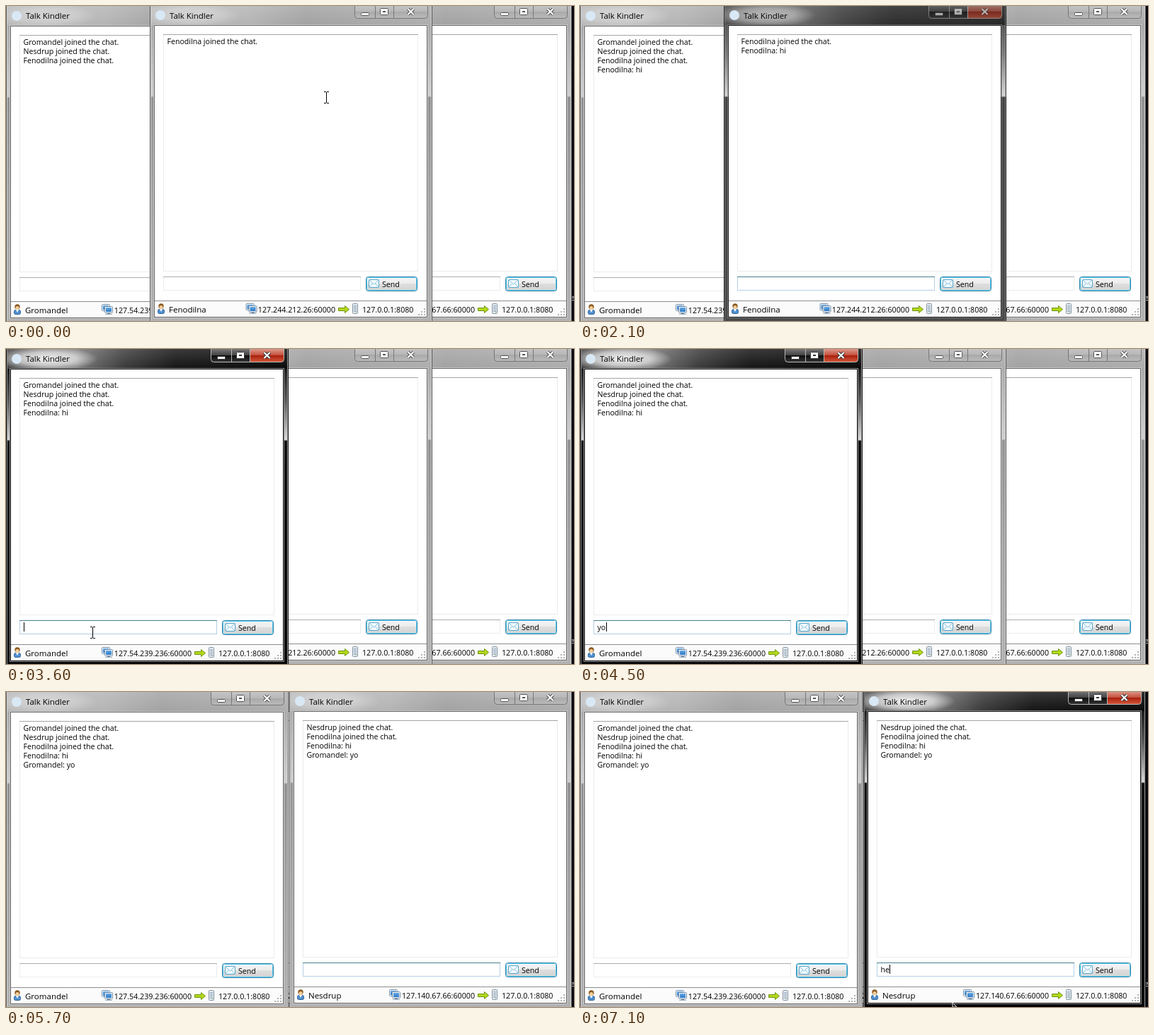
An HTML page with a canvas for the animation above (7.2 s loop, 802x446 px).

```html
<!DOCTYPE html>
<html lang="en">
<head>
<meta charset="utf-8">
<title>Chat windows</title>
<style>
html, body { margin: 0; width: 100%; height: 100%; overflow: hidden; background: #0b0b14; }
canvas { display: block; }
</style>
</head>
<body>
<canvas id="stage" width="802" height="446"></canvas>
<script>
const ctx = document.getElementById('stage').getContext('2d');
const LOOP = 7200, STEP = 100;
const UI = '"Open Sans", "Noto Sans", sans-serif';
const APP = 'Talk Kindler';
const ANN = 'Gromandel', BEN = 'Nesdrup', CAT = 'Fenodilna';

const joined = (name, at = 0) => ({ text: name + ' joined the chat.', at });
const hi = { text: CAT + ': hi', at: 1700 };
const yo = { text: ANN + ': yo', at: 4600 };

// on/off: activation times, focus: input focus span, typed: [time, text]
const left = {
  x: 0, y: 0, user: ANN, ip: '127.54.239.236:60000', ipX: 153,
  on: 3000, off: 5300, focus: [3000, 5500], caret: [3400, 5300],
  typed: [[3900, 'y'], [4100, 'yo'], [4600, '']],
  log: [joined(ANN), joined(BEN), joined(CAT), hi, yo]
};
const middle = {
  x: 203, y: -1, user: CAT, ip: '127.244.212.26:60000', ipX: 153.5,
  on: 400, off: 2000, focus: [400, 3000], caret: [400, 2000], blink: [900, 1200],
  typed: [[1300, 'h'], [1500, 'hi'], [1700, '']],
  log: [joined(CAT), hi]
};
const right = {
  x: 400, y: -1, user: BEN, ip: '127.140.67.66:60000', ipX: 159,
  on: 6300, off: 9999, focus: [5500, 9999], caret: [6300, 9999],
  typed: [[6800, 'h'], [6900, 'he']],
  log: [joined(BEN), joined(CAT), hi, yo]
};

const clamp = v => Math.max(0, Math.min(1, v));
const within = (t, [a, b]) => t >= a && t < b;

function rect(x, y, w, h, fill) {
  ctx.fillStyle = fill;
  ctx.fillRect(x, y, w, h);
}

function frame(x, y, w, h, stroke) {
  ctx.strokeStyle = stroke;
  ctx.lineWidth = 1;
  ctx.strokeRect(x + .5, y + .5, w - 1, h - 1);
}

function rounded(x, y, w, h, r, fill, stroke) {
  ctx.beginPath();
  ctx.roundRect(x, y, w, h, r);
  if (fill) { ctx.fillStyle = fill; ctx.fill(); }
  if (stroke) { ctx.strokeStyle = stroke; ctx.lineWidth = 1; ctx.stroke(); }
}

function poly(points, fill, stroke) {
  ctx.beginPath();
  points.forEach(([x, y]) => ctx.lineTo(x, y));
  ctx.closePath();
  ctx.fillStyle = fill;
  ctx.fill();
  if (stroke) { ctx.strokeStyle = stroke; ctx.lineWidth = 1; ctx.stroke(); }
}

function disc(x, y, r, fill) {
  ctx.beginPath();
  ctx.arc(x, y, r, 0, Math.PI * 2);
  ctx.fillStyle = fill;
  ctx.fill();
}

function ramp(x0, y0, x1, y1, ...stops) {
  const g = ctx.createLinearGradient(x0, y0, x1, y1);
  stops.forEach(([p, c]) => g.addColorStop(p, c));
  return g;
}

function label(text, x, y, size, align = 'left') {
  ctx.font = size + 'px ' + UI;
  ctx.textAlign = align;
  ctx.fillStyle = '#000';
  ctx.fillText(text, x, y);
}

function captionButtons(active) {
  const edge = active ? '#b8b8b8' : '#777';
  const face = active
    ? ramp(0, 0, 0, 18, [0, '#777'], [.48, '#444'], [.5, '#0c0c0c'], [1, '#333'])
    : ramp(0, 0, 0, 18, [0, '#c4c4c4'], [.48, '#b8b8b8'], [.5, '#a9a9a9'], [1, '#b9b9b9']);
  const red = ramp(0, 0, 0, 18, [0, '#dc9a8c'], [.48, '#c5503e'], [.5, '#a81d0b'], [1, '#d2573a']);
  rounded(289.5, -5, 55, 23.5, [0, 0, 0, 4], face, edge);
  rounded(344.5, -5, 48, 23.5, [0, 0, 4, 0], active ? red : face, edge);
  rect(318, 0, 1, 18, edge);

  const rim = active ? '#333' : '#555';
  rounded(298.5, 10.5, 11, 4, 1, '#fff', rim);
  rounded(325.5, 4.5, 11, 9, 1, '#fff', rim);
  rect(329, 8, 4, 2, rim);
  for (const [width, color] of [[4.4, rim], [2.2, '#fff']]) {
    ctx.strokeStyle = color;
    ctx.lineWidth = width;
    ctx.beginPath();
    ctx.moveTo(364.5, 5); ctx.lineTo(372.5, 13);
    ctx.moveTo(372.5, 5); ctx.lineTo(364.5, 13);
    ctx.stroke();
  }
}

function chrome(active) {
  rect(0, -2, 399, 452, active
    ? ramp(0, 28, 0, 446, [0, '#1c1c1c'], [.1, '#555'], [.24, '#d8d8d8'], [.245, '#111'], [1, '#050505'])
    : ramp(0, 28, 0, 446, [0, '#aaa'], [.24, '#cfcfcf'], [.245, '#929292'], [.6, '#a4a4a4'], [1, '#b2b2b2']));
  rect(0, -2, 399, 30, active
    ? ramp(0, 0, 399, 0, [0, '#444'], [.25, '#777'], [.42, '#3a3a3a'], [.6, '#151515'], [1, '#080808'])
    : ramp(0, 0, 399, 0, [0, '#b8b8b8'], [.35, '#b4b4b4'], [.55, '#a2a2a2'], [1, '#adadad']));
  rect(0, -2, 399, 30, ramp(0, 0, 0, 28, [0, 'rgba(255,255,255,.16)'], [1, 'rgba(255,255,255,0)']));

  // soft light behind the caption
  ctx.save();
  ctx.translate(58, 14);
  ctx.scale(1, .24);
  const glow = ctx.createRadialGradient(0, 0, 8, 0, 0, 72);
  const strength = active ? .85 : .35;
  glow.addColorStop(0, `rgba(255,255,255,${strength})`);
  glow.addColorStop(.5, `rgba(255,255,255,${strength * .72})`);
  glow.addColorStop(1, 'rgba(255,255,255,0)');
  rect(-58, -60, 140, 120, glow);
  ctx.restore();

  rect(0, -2, 1, 452, active ? '#111' : '#555');
  rect(1, -2, 1, 452, active ? '#888' : '#d2d2d2');
  rect(397, -2, 1, 452, active ? '#999' : '#d2d2d2');
  rect(398, -2, 1, 452, active ? '#111' : '#555');
  frame(5, 27, 388, 416, active ? '#8c8c8c' : '#cacaca');
  frame(6, 28, 386, 414, active ? '#111' : '#666');
  captionButtons(active);
}

function userIcon() {
  rounded(11.5, 430.5, 9, 6, 2, '#4f8fd0', '#356491');
  poly([[14, 430], [18, 430], [16, 434]], '#fff');
  disc(16, 426, 3.7, '#8a5a20');
  disc(16, 427.4, 2.5, '#f4cf9b');
}

function computerIcon(x) {
  const screen = (sx, sy) => {
    rounded(sx + .5, sy + .5, 11, 9, 1, '#f2f6fa', '#7890a8');
    rect(sx + 2, sy + 2, 8, 6, ramp(0, sy, 0, sy + 8, [0, '#77b9ee'], [1, '#2d78c4']));
  };
  screen(x, 422);
  screen(x + 4, 425);
  rect(x + 8, 435, 4, 1, '#7890a8');
  rect(x + 5, 436, 10, 1, '#9aabba');
}

function serverIcon() {
  rounded(286.5, 422.5, 7, 14, 1, '#e7edf3', '#8392a1');
  for (let y = 425; y < 434; y += 2) rect(288, y, 4, 1, '#8fa3b5');
  rect(291, 434, 1, 1, '#5bb030');
}

function sendButton() {
  rounded(305.5, 384.5, 72, 20, 3,
    ramp(0, 384, 0, 405, [0, '#f5f5f5'], [.48, '#ececec'], [.5, '#dedede'], [1, '#d2d2d2']), '#3580a6');
  rounded(306.5, 385.5, 70, 18, 2, null, '#50cdf2');
  rounded(309.5, 388.5, 14, 11, 1, '#f4fbff', '#58a6cb');
  ctx.strokeStyle = '#7fbcda';
  ctx.beginPath();
  ctx.moveTo(310, 389); ctx.lineTo(316.5, 395); ctx.lineTo(323, 389);
  ctx.moveTo(310, 399); ctx.lineTo(314.5, 394);
  ctx.moveTo(323, 399); ctx.lineTo(318.5, 394);
  ctx.stroke();
  label('Send', 328, 399, 10.6);
}

function statusBar(win) {
  rect(7, 419, 384, 22, '#fbfbfb');
  rect(7, 418, 384, 1, '#8e8e8e');
  userIcon();
  label(win.user, 27, 435, 11.5);
  computerIcon(win.ipX - 18);
  label(win.ip, 262, 434.5, 10.7, 'right');
  poly([[266.5, 428.5], [275.5, 428.5], [275.5, 425.5], [281.5, 430.5], [275.5, 435.5], [275.5, 432.5], [266.5, 432.5]],
    '#b4d819', '#6c9410');
  serverIcon();
  label('127.0.0.1:8080', 300, 434.5, 10.7);
  for (let row = 0; row < 3; row++) {
    for (let col = 2 - row; col < 3; col++) rect(379 + col * 4, 429 + row * 4, 2, 2, '#b2b2b2');
  }
}

function inputBox(win, t) {
  const focused = within(t, win.focus);
  frame(19, 384, 279, 20, focused ? '#b5cfe4' : '#ececec');
  rect(19, 384, 279, 1, focused ? '#4b7f8e' : '#acacac');
  const entry = win.typed.filter(([at]) => t >= at).pop();
  const text = entry ? entry[1] : '';
  label(text, 24.5, 398, 10.6);
  if (within(t, win.caret) && !(win.blink && within(t, win.blink))) {
    const shift = text ? Math.round(ctx.measureText(text).width) : 0;
    rect(25 + shift, 387, 1, 13, '#000');
  }
}

function drawWindow(win, t) {
  ctx.save();
  ctx.translate(win.x, win.y);
  chrome(false);
  const active = clamp((t - win.on) / 250) * (1 - clamp((t - win.off) / 250));
  if (active > 0) {
    ctx.globalAlpha = active;
    chrome(true);
    ctx.globalAlpha = 1;
  }
  disc(15, 14, 7, '#d9e8f5');
  label(APP, 28, 18 - win.y * .5, 11.5);

  rect(7, 29, 384, 412, '#fff');
  frame(19, 41, 360, 336, '#ebebeb');
  rect(19, 41, 360, 1, '#a4a4a4');
  win.log.filter(m => t >= m.at).forEach((m, i) => label(m.text, 24.5, 55 + i * 13, 10.6));
  inputBox(win, t);
  sendButton();
  statusBar(win);
  ctx.restore();
}

function beam(x, y) {
  rect(x, y - 7, 1, 15, '#000');
  for (const end of [y - 8, y + 8]) {
    rect(x - 3, end, 3, 1, '#000');
    rect(x + 1, end, 3, 1, '#000');
  }
}

function pointer(t) {
  if (t < 1200) {
    const p = clamp(t / 400), ease = p * p * (3 - 2 * p);
    beam(Math.round(452 - 76 * ease), Math.round(129 + 274 * ease));
  } else if (within(t, [3400, 3900])) {
    const p = clamp((t - 3300) / 300);
    beam(122, Math.round(460 - 59 * p));
  } else if (t >= 7100) {
    poly([[526, 440], [532, 446], [526, 446]], '#111', '#ddd');
  }
}

function draw(t) {
  rect(0, 0, 802, 446, '#0b0b14');
  const order = t < 3000 ? [left, right, middle]
    : t < 5500 ? [right, middle, left] : [middle, left, right];
  order.forEach(win => drawWindow(win, t));
  ctx.save();
  ctx.beginPath();
  ctx.rect(799, 400, 3, 24);
  ctx.clip();
  ctx.font = '11px ' + UI;
  ctx.textAlign = 'left';
  ctx.fillStyle = '#ddd';
  ctx.fillText('e', 797, 417);
  ctx.restore();
  pointer(t);
}

const start = performance.now();
function tick() {
  const t = (performance.now() - start) % LOOP;
  draw(Math.floor(t / STEP) * STEP);
  requestAnimationFrame(tick);
}
tick();
</script>
</body>
</html>
```
